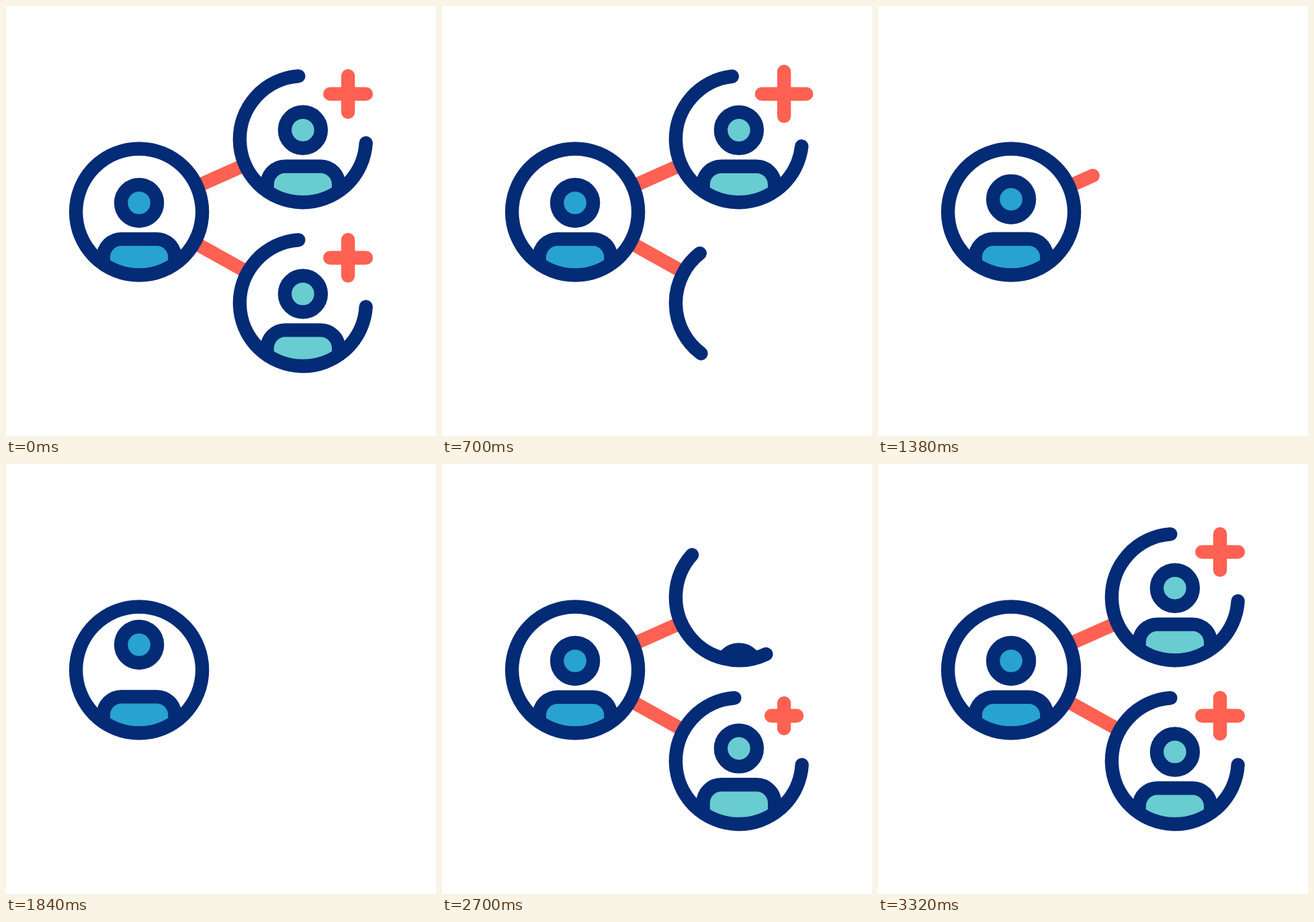
These frames come from a looping animation (640 px wide and 640 px high, 3600 ms). An HTML page:

```html
<!DOCTYPE html>
<html lang="en">
<head>
<meta charset="utf-8">
<title>Referral network</title>
<style>
  html, body { margin: 0; width: 100%; height: 100%; overflow: hidden; background: #fff; }
  svg { display: block; width: 100%; height: 100%; }
</style>
</head>
<body>
<svg id="stage" viewBox="0 0 640 640" fill="none" stroke-width="20.4" stroke-linecap="round"></svg>
<script>
const LOOP = 3600, RADIUS = 94, WINDUP = 64;
const NAVY = '#032b76', CORAL = '#ff6152', BLUE = '#28a2ce', TEAL = '#68ccd1';
const HUB = { x: 198.1, y: 306.5 };
const stage = document.getElementById('stage');

function add(parent, tag, attrs) {
  const el = document.createElementNS('http://www.w3.org/2000/svg', tag);
  for (const k in attrs) el.setAttribute(k, attrs[k]);
  parent.appendChild(el);
  return el;
}

// Smooth 0..1 ramp beginning at start.
function ramp(t, start, length) {
  const x = Math.min(1, Math.max(0, (t - start) / length));
  return x * x * (3 - 2 * x);
}

const mix = (a, b, k) => a + (b - a) * k;

// 1 at rest, 0 while away.
const presence = (t, [leave, enter], out, back) =>
  1 - ramp(t, leave, out) + ramp(t, enter, back);

// Winds up past rest before leaving and overshoots on the way back.
function swing(t, [leave, enter], { rest, peak, gone, out, back, settle }) {
  if (t < leave + WINDUP) return mix(rest, peak, ramp(t, leave, WINDUP));
  if (t < enter) return mix(peak, gone, ramp(t, leave + WINDUP, out));
  if (t < enter + back) return mix(gone, peak, ramp(t, enter, back));
  return mix(peak, rest, ramp(t, enter + back, settle));
}

const DROP = { rest: 0, peak: -16.5, gone: 150, out: 332, back: 332, settle: 260 };
const ARM = { rest: 26.8, peak: 36.8, gone: 0, out: 560, back: 480, settle: 64 };

const show = (el, on) => el.setAttribute('visibility', on ? 'visible' : 'hidden');
const shift = (el, y) => el.setAttribute('transform', `translate(0 ${y.toFixed(2)})`);

function polar(deg, r = RADIUS) {
  const a = deg * Math.PI / 180;
  return `${(r * Math.cos(a)).toFixed(2)} ${(r * Math.sin(a)).toFixed(2)}`;
}

// Head and shoulders around a local origin at the ring's centre.
function makePerson(parent, fill) {
  const clip = add(parent, 'g', { 'clip-path': 'url(#disc)' });
  const group = add(clip, 'g', { fill, stroke: NAVY });
  const body = add(group, 'path', {
    d: 'M-53.3 125V67.4a27 27 0 0 1 27-27H26.3a27 27 0 0 1 27 27V125Z'
  });
  const head = add(group, 'circle', { cy: -13.5, r: 27 });
  return { group, body, head };
}

const disc = add(add(stage, 'defs', {}), 'clipPath', { id: 'disc' });
add(disc, 'circle', { r: RADIUS });

// Each part has its [leave, enter] times.
const friends = [
  { x: 441.9, y: 198.2, arc: [654, 2380], link: [1210, 2120], person: [572, 2609], plus: [529, 2707] },
  { x: 441.9, y: 442, arc: [380, 2038], link: [930, 1832], person: [284, 2422], plus: [52, 2457] }
];

for (const f of friends) {
  const dx = f.x - HUB.x, dy = f.y - HUB.y;
  f.angle = Math.atan2(dy, dx) * 180 / Math.PI;
  f.span = Math.hypot(dx, dy) - 2 * RADIUS;
  f.linkEl = add(stage, 'path', {
    stroke: CORAL, transform: `translate(${HUB.x} ${HUB.y}) rotate(${f.angle})`
  });
}
for (const f of friends) {
  const g = add(stage, 'g', { transform: `translate(${f.x} ${f.y})` });
  f.figure = makePerson(g, TEAL).group;
  f.arcEl = add(g, 'path', { stroke: NAVY });
  f.plusEl = add(g, 'path', { stroke: CORAL, transform: 'translate(67.2 -67.3)' });
}

const hub = add(stage, 'g', { transform: `translate(${HUB.x} ${HUB.y})` });
const host = makePerson(hub, BLUE);
add(hub, 'circle', { r: RADIUS, stroke: NAVY });

function drawFriend(f, t) {
  const link = presence(t, f.link, 340, 240);
  show(f.linkEl, link > 0);
  f.linkEl.setAttribute('d', `M${RADIUS} 0h${f.span * link}`);

  // The ring grows both ways from where the link touches it.
  const open = presence(t, f.arc, 566, 566), pivot = 180 + f.angle;
  const from = mix(pivot, 3.5, open), to = mix(pivot, 266, open);
  show(f.arcEl, open > 0);
  f.arcEl.setAttribute('d',
    `M${polar(from)}A${RADIUS} ${RADIUS} 0 ${to - from > 180 ? 1 : 0} 1 ${polar(to)}`);

  const drop = swing(t, f.person, DROP);
  show(f.figure, drop < DROP.gone);
  shift(f.figure, drop);

  const arm = swing(t, f.plus, ARM);
  show(f.plusEl, arm > 0);
  f.plusEl.setAttribute('d', `M${-arm} 0H${arm}M0 ${-arm}V${arm}`);
}

function draw(t) {
  for (const f of friends) drawFriend(f, t);
  const lift = -24.2 * (ramp(t, 1200, 600) - ramp(t, 1800, 750));
  shift(host.head, lift);
  shift(host.body, lift * 0.02);
}

const start = performance.now();
function tick() {
  draw((performance.now() - start) % LOOP);
  requestAnimationFrame(tick);
}
draw(0);
requestAnimationFrame(tick);
</script>
</body>
</html>
```
